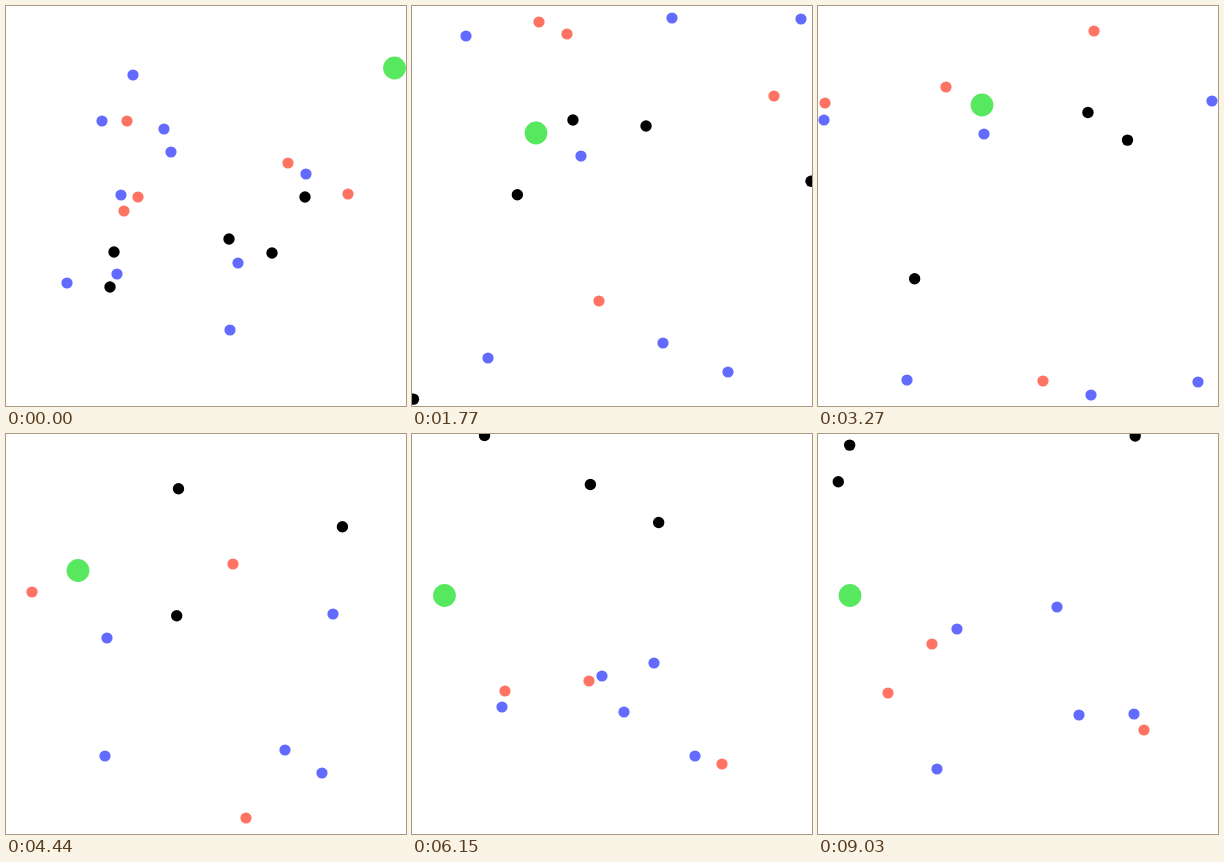
Animation, 400 px wide and 400 px high, one loop 9060 ms. Source, as an HTML page with a canvas:

```html
<!DOCTYPE html>
<html lang="en">
<head>
<meta charset="utf-8">
<title>Drifting dots</title>
<style>
html, body { margin: 0; width: 100%; height: 100%; overflow: hidden; background: #fff; }
canvas { display: block; }
</style>
</head>
<body>
<canvas id="stage" width="400" height="400"></canvas>
<script>
const SIZE = 400, LOOP = 9060, STEP = 30;
const TIMES = [0, 1770, 3270, 4440, 6150, 7200, 9030];
const ctx = document.getElementById('stage').getContext('2d');

// Turns waypoints at the common times, plus sharp turns at their own times, into knots.
function path(points, turns = {}) {
  const knots = points.map(([x, y], i) => ({ t: TIMES[i], p: [x, y] }));
  for (const t in turns) knots.push({ t: +t, p: turns[t], sharp: true });
  return knots.sort((a, b) => a.t - b.t);
}

const slope = (a, b, axis) => (b.p[axis] - a.p[axis]) / (b.t - a.t);

// Harmonic mean of neighbouring slopes: smooth without overshoot.
function tangent(knots, i, axis, fallback) {
  if (i === 0 || i === knots.length - 1 || knots[i].sharp) return fallback;
  const a = slope(knots[i - 1], knots[i], axis);
  const b = slope(knots[i], knots[i + 1], axis);
  return a * b > 0 ? 2 * a * b / (a + b) : 0;
}

function at(knots, t, axis) {
  let i = 0;
  while (i < knots.length - 2 && t >= knots[i + 1].t) i++;
  const a = knots[i], b = knots[i + 1], span = b.t - a.t, s = (t - a.t) / span;
  const m = slope(a, b, axis);
  const ma = tangent(knots, i, axis, m), mb = tangent(knots, i + 1, axis, m);
  const ease = s * s * (3 - 2 * s);
  return a.p[axis] + (b.p[axis] - a.p[axis]) * ease
    + span * s * (1 - s) * (ma * (1 - s) - mb * s);
}

const blues = [
  path([[127, 69], [54, 30], [6, 114], [101, 204], [212, 278], [233, 389], [261, 281]],
    { 1200: [78, 1], 3190: [1, 108], 7350: [236, 395] }),
  path([[165, 146], [169, 150], [166, 128]], { 3450: [166, 122] }),
  path([[300, 168], [389, 13], [394, 95], [327, 180], [242, 229], [235, 216], [239, 173]]),
  path([[61, 277], [76, 352], [89, 374], [99, 322], [90, 273], [124, 320], [119, 335]],
    { 2680: [84, 399] }),
  path([[232, 257], [251, 337], [273, 389], [279, 316], [190, 242], [165, 221], [139, 195]],
    { 3090: [271, 399] }),
  path([[224, 324], [316, 366], [380, 376], [316, 339], [283, 322], [299, 314], [316, 280]],
    { 2900: [399, 388] }),
  path([[158, 123], [260, 12]], { 2400: [298, 40] }),
  path([[96, 115]], { 1440: [50, 100] }),
  path([[115, 189]], { 1590: [130, 140] }),
  path([[111, 268]], { 1320: [160, 215] })
];

const reds = [
  path([[121, 115], [127, 16], [7, 97], [26, 158], [93, 257], [81, 238], [70, 259]],
    { 3770: [1, 122] }),
  path([[342, 188], [362, 90], [276, 25], [227, 130], [177, 247], [145, 233], [114, 210]],
    { 2990: [288, 2] }),
  path([[118, 205], [187, 295], [225, 375], [240, 384], [310, 330], [312, 308], [326, 296]],
    { 3900: [232, 398] }),
  path([[132, 191], [155, 28], [128, 81]], { 3600: [122, 95] }),
  path([[282, 157]], { 1200: [250, 110] })
];

const green = path(
  [[388.5, 62], [124, 127], [164, 99], [72, 136.5], [32.5, 161.5], [32, 161.5], [32, 161.5]]);
green.splice(4, 0, { t: 5400, p: [34, 160.5] });

// Black dots fly straight, bounce off the walls and share one slowing clock.
const clock = path([[0, 0], [1620, 0], [3170, 0], [4340, 0], [5540, 0], [6050, 0], [6654, 0]]);
const blacks = [
  { x: 108, y: 246, vx: -0.1317, vy: -0.0353 },
  { x: 266, y: 247, vx: 0.0833, vy: -0.0443 },
  { x: 104, y: 281, vx: -0.0633, vy: 0.0777 },
  { x: 223, y: 233, vx: -0.0383, vy: -0.0735, end: 2100 },
  { x: 299, y: 191, vx: -0.0401, vy: -0.0438, end: 2600 }
];

function fold(v) {
  const m = ((v % (2 * SIZE)) + 2 * SIZE) % (2 * SIZE);
  return m > SIZE ? 2 * SIZE - m : m;
}

function disc(x, y, r, color) {
  ctx.fillStyle = color;
  ctx.beginPath();
  ctx.arc(x, y, r, 0, 2 * Math.PI);
  ctx.fill();
}

function follow(knots, t, r, color) {
  if (t <= knots[knots.length - 1].t) disc(at(knots, t, 0), at(knots, t, 1), r, color);
}

function draw(t) {
  ctx.fillStyle = '#fff';
  ctx.fillRect(0, 0, SIZE, SIZE);
  for (const b of blues) follow(b, t, 5.6, '#636bff');
  for (const r of reds) follow(r, t, 5.6, '#ff7363');
  const u = at(clock, t, 0);
  for (const { x, y, vx, vy, end = LOOP } of blacks)
    if (t < end) disc(fold(x + vx * u), fold(y + vy * u), 5.7, '#000');
  follow(green, t, 11.4, '#58e860');
}

const start = performance.now();
function frame() {
  const t = (performance.now() - start) % LOOP;
  draw(Math.floor(t / STEP) * STEP);
  requestAnimationFrame(frame);
}
frame();
</script>
</body>
</html>
```
